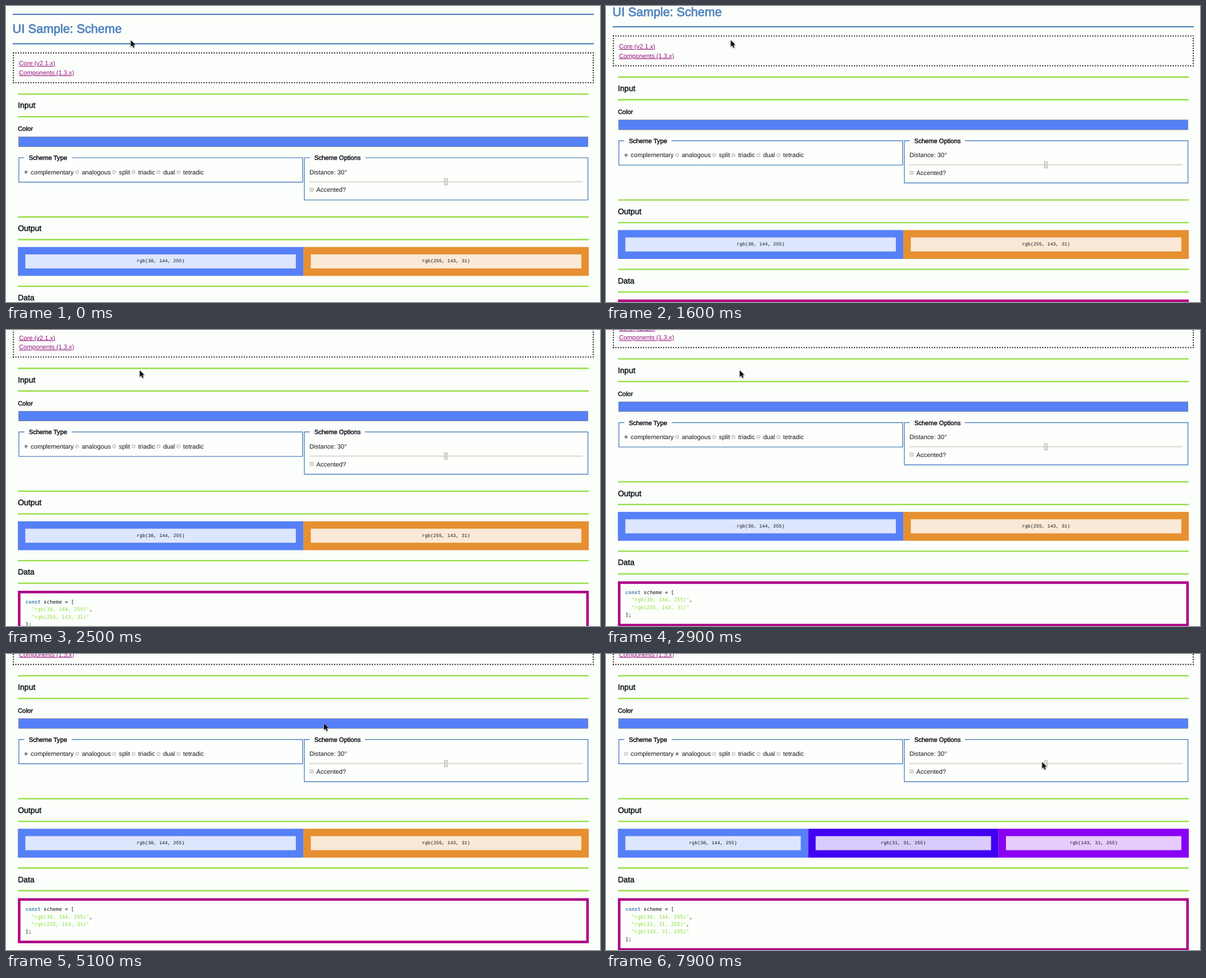
Animation of 1059 by 529 pixels, one loop 8000 ms. Source, as an HTML page:

```html
<!DOCTYPE html>
<html lang="en">
<head>
<meta charset="utf-8">
<title>UI Sample: Scheme</title>
<style>
  html, body { margin: 0; width: 100%; height: 100%; overflow: hidden; background: #fbfefa; }
  svg { display: block; width: 1059px; height: 529px; }
  text { font: 11.2px "Liberation Sans", Arial, sans-serif; fill: #10131c; white-space: pre; text-rendering: geometricPrecision; }
  .bold { stroke: #10131c; stroke-width: .5px; }
  .h1 { font-size: 21.92px; fill: #5082be; stroke: #5082be; stroke-width: .8px; }
  .h2 { font-size: 14px; }
  .link { fill: #960f7e; text-decoration: underline; }
  .rgb { font: 8.4px "Liberation Mono", monospace; text-anchor: middle; }
  .code { font: 9px "DejaVu Sans Mono", monospace; }
  .key { font-weight: bold; fill: #5082be; }
  .str { fill: #92de42; }
</style>
</head>
<body>
<svg viewBox="0 0 1059 529">
  <g id="page"><g id="fixed"></g><g id="live"></g></g>
  <path id="cursor" d="M0 0V11.6L2.6 9.2 4.7 13.6 6.6 12.7 4.6 8.5H8.2Z" fill="#0b0b0b" stroke="#fff"
    stroke-width="1" paint-order="stroke" style="filter: drop-shadow(.8px 1px .8px #0006)"/>
</svg>
<script>
const $ = id => document.getElementById(id);
const BLUE = '#5082be', GREEN = '#92de42', PLUM = '#ae0588';
const LEFT = 21.2, RIGHT = 1039;
const COLORS = {
  'rgb(30, 144, 255)': '#5680f7',
  'rgb(255, 143, 31)': '#e69031',
  'rgb(31, 31, 255)': '#4200f3',
  'rgb(143, 31, 255)': '#8900f4'
};
const [base, opposite, ...near] = Object.keys(COLORS);
const SCHEMES = [[base, opposite], [base, ...near]];
const TYPES = ['complementary', 'analogous', 'split', 'triadic', 'dual', 'tetradic'];

const text = (x, y, s, cls = '') => `<text x="${x}" y="${y}" class="${cls}">${s}</text>`;
const rect = (x, y, w, h, fill, more = '') =>
  `<rect x="${x}" y="${y}" width="${w}" height="${h}" fill="${fill}" ${more}/>`;
const path = (d, color, width, more = '') =>
  `<path d="${d}" fill="none" stroke="${color}" stroke-width="${width}" ${more}/>`;
const circle = (x, y, r, fill, more = '') =>
  `<circle cx="${x}" cy="${y}" r="${r}" fill="${fill}" ${more}/>`;
const rule = (x1, x2, y, color) => path(`M${x1} ${y}H${x2}`, color, 2.3);

// Dotted line whose gaps are evened out so that a dot sits on both ends
function dots(x1, y1, x2, y2) {
  const length = Math.hypot(x2 - x1, y2 - y1), step = length / Math.round(length / 4.48);
  return path(`M${x1} ${y1}L${x2} ${y2}`, '#111', 2.25,
    `stroke-dasharray="0 ${step}" stroke-linecap="round"`);
}

const dottedBox = (x1, y1, x2, y2) =>
  dots(x1, y1, x2, y1) + dots(x1, y2, x2, y2) + dots(x1, y1, x1, y2) + dots(x2, y1, x2, y2);

const section = (y, title) =>
  rule(LEFT, RIGHT, y, GREEN) + rule(LEFT, RIGHT, y + 40.5, GREEN) +
  text(LEFT, y + 25.2, title, 'bold h2');

const fieldset = (x, right, bottom, gapEnd, title) =>
  rect(x, 270.8, right - x, bottom - 270.8, '#fefffd') +
  path(`M${x + 9.7} 270.8H${x}V${bottom}H${right}V270.8H${gapEnd}`, BLUE, 1.4) +
  text(x + 17.8, 274.9, title, 'bold');

$('fixed').innerHTML =
  rule(12, 1048, 14.6, BLUE) + text(11.6, 48, 'UI Sample: Scheme', 'h1') + rule(12, 1048, 67.1, BLUE) +
  dottedBox(13.2, 83.6, 1047, 136.8) +
  text(23.2, 106, 'Core (v2.1.x)', 'link') + text(23.2, 122.7, 'Components (1.3.x)', 'link') +
  section(157, 'Input') +
  text(LEFT, 223, 'Color', 'bold') +
  rect(22.6, 233.6, 1015, 17.5, COLORS[base], 'stroke="#777" stroke-width=".7"') +
  fieldset(22.9, 528.8, 314.4, 117, 'Scheme Type') +
  fieldset(531.9, 1037.5, 346.3, 640, 'Scheme Options') +
  text(541, 300.4, 'Distance: 30°') +
  rect(541, 312.7, 487, 2.3, '#dcdcd6') +
  rect(781.6, 308.2, 5.4, 11.4, '#e9e8e1', 'stroke="#a5a49c" stroke-width=".8"') +
  path('M783.2 312.2h2.2m-2.2 1.8h2.2m-2.2 1.8h2.2', '#aaa9a0', .6) +
  rect(541.9, 325, 6, 6, '#e6e6e4', 'rx=".8" stroke="#a6a6a6" stroke-width=".8"') +
  text(553.3, 332.2, 'Accented?') +
  section(376.7, 'Output') +
  section(500.6, 'Data');

const pen = document.createElement('canvas').getContext('2d');
pen.font = '11.2px "Liberation Sans", Arial, sans-serif';

function drawRadios(active) {
  let x = 44.1;
  return TYPES.map((name, i) => {
    const labelX = x, dotX = x - 8.4;
    x += pen.measureText(name).width + 14.55;
    return circle(dotX, 296.5, 3.1, '#e8e8e6', 'stroke="#a9a9a9" stroke-width=".8"') +
      (i === active ? circle(dotX, 296.5, 1.6, '#4c4c4c') : '') +
      text(labelX, 300.4, name);
  }).join('');
}

function drawScheme(active) {
  const list = SCHEMES[active], w = (RIGHT - LEFT) / list.length;
  const swatches = list.map((name, i) => {
    const x = LEFT + i * w;
    return rect(x, 430.4, w, 51.6, COLORS[name]) +
      rect(x + 13.3, 443.6, w - 26.6, 25.1, '#fff', 'opacity=".8"') +
      text(x + w / 2, 458.1, name, 'rgb');
  });
  const lines = [
    '<tspan class="key">const</tspan> scheme = [',
    list.map(name => `  <tspan class="str">"${name}"</tspan>`).join(',\n'),
    '];'
  ].join('\n').split('\n');
  const code = lines.map((s, i) => text(34.6, 577.4 + i * 13.4, s, 'code'));
  const box = rect(23.5, 556.8, 1013.2, 22.3 + lines.length * 13.4, 'none',
    `stroke="${PLUM}" stroke-width="4.6"`);
  $('live').innerHTML = [drawRadios(active), ...swatches, box, ...code].join('');
}

const clamp = p => Math.max(0, Math.min(1, p));
const ease = p => p * p * (3 - 2 * p);

// Each wheel tick glides the page up by one notch
const TICKS = [1300, 1600, 2300, 2800], NOTCH = 29.6;
const scroll = t => TICKS.reduce((sum, start) =>
  sum + NOTCH * ease(clamp((t - start + 20) / 220)), 0);

// Arrival time and place of each pointer stop
const STOPS = [
  [0, 222.5, 61], [2500, 238.5, 72], [3600, 273.5, 84.5], [3800, 122, 130.5], [4400, 105, 146.5],
  [5000, 567, 124], [5600, 117.5, 155.5], [6200, 183, 179.5], [6400, 198, 193],
  [6500, 127, 179.5], [7400, 548, 180], [7900, 777.5, 193]
];

function pointer(t) {
  const next = STOPS.findIndex(stop => stop[0] > t);
  if (next < 0) return STOPS.at(-1).slice(1);
  const [t0, x0, y0] = STOPS[next - 1], [t1, x1, y1] = STOPS[next];
  const p = ease(clamp(1 - (t1 - t) / Math.min(400, t1 - t0)));
  return [x0 + (x1 - x0) * p, y0 + (y1 - y0) * p];
}

let shown = -1;
function frame(now) {
  const t = Math.floor(now % 8000 / 100) * 100;
  const active = t < 6700 ? 0 : 1;
  if (active !== shown) drawScheme(shown = active);
  $('page').setAttribute('transform', `translate(0 ${.3 - scroll(t)})`);
  $('cursor').setAttribute('transform', `translate(${pointer(t)})`);
  requestAnimationFrame(frame);
}
frame(0);
</script>
</body>
</html>
```
